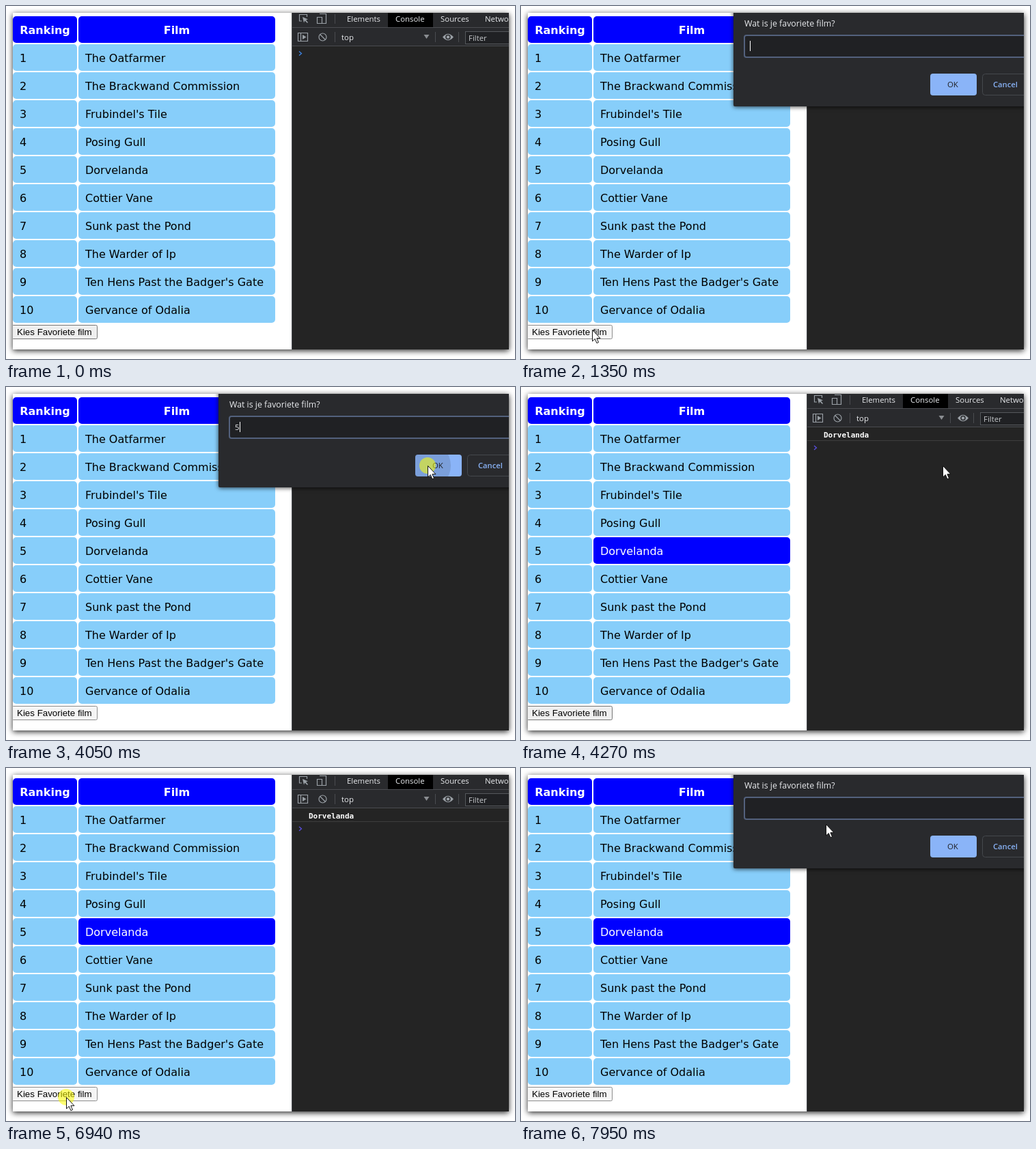
These frames come from a looping animation (745x517 px, 8 s). An HTML page:

```html
<!DOCTYPE html>
<html lang="nl">
<head>
<meta charset="utf-8">
<title>Favoriete film</title>
<style>
  html, body { margin: 0; width: 100%; height: 100%; overflow: hidden; background: #fff; }
  svg { display: block; width: 745px; height: 517px; }
  .page { font: 16px "DejaVu Sans", sans-serif; }
  .head { font-weight: 700; fill: #fff; text-anchor: middle; }
  .btn { font: 13.333px "Liberation Sans", Arial, sans-serif; }
  .tools { font: 11.4px "Open Sans", sans-serif; fill: #e8eaed; }
  .mono { font: 700 11px "DejaVu Sans Mono", monospace; fill: #fff; }
  .ask { font-size: 12.35px; }
  .icon { fill: none; stroke: #9aa0a6; stroke-width: 1.2; }
  .rule { stroke: #4a4c50; }
  #frame { filter: drop-shadow(0 2px 4px rgba(0, 0, 0, .85)); }
  #box { filter: drop-shadow(0 1px 3px rgba(0, 0, 0, .7)); }
</style>
</head>
<body>
<svg id="stage" viewBox="0 0 745 517" xmlns="http://www.w3.org/2000/svg"></svg>
<script>
const LOOP = 8000;
const PICK = 4;
const films = [
  "The Oatfarmer", "The Brackwand Commission", "Frubindel's Tile", "Posing Gull", "Dorvelanda",
  "Cottier Vane", "Sunk past the Pond", "The Warder of Ip", "Ten Hens Past the Badger's Gate",
  "Gervance of Odalia"
];

const rect = (x, y, w, h, fill, more = "") =>
  `<rect x="${x}" y="${y}" width="${w}" height="${h}" fill="${fill}" ${more}/>`;
const text = (x, y, str, more = "") => `<text x="${x}" y="${y}" ${more}>${str}</text>`;
const path = (d, more = 'class="icon"') => `<path d="${d}" ${more}/>`;

function table() {
  const cells = (y, fill, id = "") =>
    rect(10, y, 94, 39, fill, 'rx="5"') + rect(106, y, 288, 39, fill, `rx="5" ${id}`);
  const head = cells(15, "#00f") + text(57, 41, "Ranking", 'class="head"') +
    text(250, 41, "Film", 'class="head"');
  const rows = films.map((name, i) => {
    const y = 56 + 41 * i;
    const picked = i === PICK;
    return cells(y, "#87cefa", picked ? 'id="pickCell"' : "") +
      text(20, y + 26, i + 1) + text(116, y + 26, name, picked ? 'id="pickText"' : "");
  });
  return `<g class="page">${head}${rows.join("")}</g>`;
}

function devtools() {
  const tabs = [[499, "Elements"], [570, "Console"], [636, "Sources"], [701, "Network"]];
  return `<g class="tools">
    ${rect(418, 10, 318, 493, "#242424")}
    ${rect(418, 10, 318, 48, "#292a2d")}
    ${rect(559, 10, 66, 21, "#000")}
    ${path("M418.5 10V503M419 31.5H736M419 58.5H736M481.5 12V26M481.5 38V53M628.5 38V53M662.5 38V53", 'class="rule"')}
    ${tabs.map(([x, s]) => text(x, 23, s)).join("")}
    ${path("M433 22H429.500V12.500H440.500V16")}
    ${path("M434 16L442 19.500L439 20.500L442 24L441 25L437.500 21.500L436 24.500Z", 'fill="#9aa0a6"')}
    ${path("M458 25.500H455.500V18M459 11.500H468.500V25.500H463M455.500 16.500H462.500V25.500H455.500Z")}
    ${path("M427.500 39.500H441.500V51.500H427.500ZM431.500 39.500V51.500")}
    ${path("M434 42L439.500 45.500L434 49Z", 'fill="#9aa0a6"')}
    <circle cx="463.5" cy="45.500" r="5.500" class="icon" stroke-width="1.5"/>
    ${path("M459.500 41.500L467.500 49.500")}
    ${text(491, 50, "top")}
    ${path("M611.500 42H619.500L615.500 48Z", 'fill="#8a8d91"')}
    ${path("M639 45.500Q647 36 655 45.500Q647 55 639 45.500Z", 'fill="#9aa0a6"')}
    <circle cx="647" cy="45.500" r="3" fill="#9aa0a6" stroke="#292a2d" stroke-width="1.5"/>
    ${rect(672.5, 37.5, 80, 18, "#202124", 'stroke="#55585c"')}
    ${text(677, 51, "Filter", 'fill="#c4c7ca"')}
    <g id="log">${text(443, 74, films[PICK], 'class="mono"')}
      ${path("M419 78.500H736", 'stroke="#3d3d3d"')}</g>
    ${path("M429 66.500L432.500 69.500L429 72.500", 'id="chevron" fill="none" stroke-width="1.3"')}
  </g>`;
}

function dialog() {
  return `<g id="dialog" class="tools">
    ${rect(311, -10, 460, 157, "#292a2d", 'id="box" rx="2"')}
    ${text(327, 30, "Wat is je favoriete film?", 'class="ask"')}
    ${rect(327, 43, 440, 32, "#202124", 'rx="3" stroke="#53617d" stroke-width="2"')}
    ${text(335, 63, "5", 'id="typed"')}
    ${rect(335, 51, 1, 15, "#fff", 'id="caret"')}
    ${rect(599, 99, 68, 32, "#8ab4f8", 'rx="4"')}
    <circle id="ripple" cx="617" cy="115" fill="#202124" fill-opacity=".14" clip-path="url(#okClip)"/>
    ${text(624, 119, "OK", 'fill="#202124" font-weight="500"')}
    ${rect(675.5, 99.5, 80, 31, "none", 'rx="4" stroke="#45484d"')}
    ${text(691, 119, "Cancel", 'fill="#8ab4f8" font-weight="600" font-size="11.2"')}
  </g>`;
}

const stage = document.getElementById("stage");
stage.innerHTML = `
  <defs>
    <clipPath id="view">${rect(10, 10, 726, 493, "#000")}</clipPath>
    <clipPath id="okClip">${rect(599, 99, 68, 32, "#000", 'rx="4"')}</clipPath>
  </defs>
  ${rect(10, 10, 726, 493, "#fff", 'id="frame"')}
  <g clip-path="url(#view)">
    ${table()}
    ${rect(8.5, 467.5, 125, 20, "#efefef", 'id="button" rx="2"')}
    ${text(16, 482, "Kies Favoriete film", 'class="btn"')}
    ${devtools()}
    ${dialog()}
    <circle id="halo" r="12" fill="#ff0" fill-opacity=".55"/>
    ${path("M0 0V16.500L3.800 13L6.400 19.200L9 18.100L6.400 12.200H11.500Z",
      'id="cursor" fill="#fff" stroke="#111" stroke-width="1" stroke-linejoin="round"')}
  </g>`;

const el = {};
stage.querySelectorAll("[id]").forEach(node => el[node.id] = node);
const set = (node, attrs) => {
  for (const key in attrs) node.setAttribute(key, attrs[key]);
};
const show = (node, on) => set(node, { visibility: on ? "visible" : "hidden" });
const clamp = v => Math.max(0, Math.min(1, v));
const smooth = v => v * v * (3 - 2 * v);

// Pointer moves: start, end, number of steps, Bezier points
const moves = [
  [500, 880, 6, [[158, 498], [145, 480], [115, 480], [104, 474]]],
  [1900, 2310, 6, [[105, 476], [112, 490], [125, 500], [138, 506]]],
  [2620, 3390, 11, [[145, 494], [420, 420], [780, 100], [614, 112]]],
  [3470, 3650, 3, [[615, 113], [617, 115]]],
  [4430, 5230, 11, [[614, 118], [590, 172], [560, 168], [544, 138]]],
  [5300, 6070, 11, [[533, 128], [470, 220], [250, 430], [120, 467]]],
  [6150, 6770, 9, [[125, 466], [290, 425], [250, 510], [88, 482]]],
  [7100, 7870, 11, [[88, 482], [110, 470], [400, 250], [441, 103]]],
  [7950, 8000, 2, [[446, 82]]]
];

function bezier(pts, p) {
  while (pts.length > 1) {
    pts = pts.slice(1).map((b, i) => b.map((v, k) => pts[i][k] + (v - pts[i][k]) * p));
  }
  return pts[0];
}

function pointer(t) {
  const move = moves.filter(m => m[0] <= t).pop();
  if (!move) return null;
  const [start, end, steps, pts] = move;
  const gap = (end - start) / (steps - 1);
  return bezier(pts, smooth(clamp(Math.floor((t - start) / gap + 1e-6) / (steps - 1))));
}

// Dialog opacity changes in hard steps of 80 ms
function dialogLevel(t) {
  const opening = dt => dt < 0 ? 0 : [.09, .7][Math.floor(dt / 80)] ?? 1;
  if (t >= 7100) return opening(t - 7100);
  if (t >= 4110) return [.7, .1][Math.floor((t - 4110) / 80)] ?? 0;
  return opening(t - 1190);
}

function caretOn(t) {
  const start = t >= 7100 ? 7250 : t >= 2620 ? 2620 : 1250;
  return t >= start && Math.floor((t - start) / 500) % 2 === 0;
}

function draw(t) {
  const pos = pointer(t);
  show(el.cursor, pos);
  if (pos) {
    const [x, y] = pos.map(Math.round);
    set(el.cursor, { transform: `translate(${x + .5} ${y + .5})` });
    set(el.halo, { cx: x, cy: y });
  }
  const clicks = [[1030, 1190], [3880, 4190], [6940, 7180]];
  show(el.halo, clicks.some(([a, b]) => t >= a && t < b));

  const pressed = (t >= 1030 && t < 4190) || t >= 6940;
  const hover = pos && pos[0] < 134 && pos[1] >= 467 && pos[1] < 488;
  const [fill, stroke] = pressed ? ["#f5f5f5", "#8d8d8d"] :
    hover ? ["#e5e5e5", "#4f4f4f"] : ["#efefef", "#767676"];
  set(el.button, { fill, stroke });

  const done = t >= 4190;
  set(el.pickCell, { fill: done ? "#00f" : "#87cefa" });
  set(el.pickText, { fill: done ? "#fff" : "#000" });
  show(el.log, done);
  set(el.chevron, {
    stroke: done ? "#5a4fe0" : "#3d86e8",
    transform: `translate(0 ${done ? 19.5 : 0})`
  });

  const level = dialogLevel(t);
  const away = (1 - level) / .91;
  const scale = 1 + .017 * away;
  set(el.dialog, {
    opacity: level,
    display: level ? "inline" : "none",
    transform: `translate(${541 * (1 - scale)} ${-16.5 * away}) scale(${scale})`
  });
  const typed = t >= 2620 && t < 4300;
  set(el.typed, { display: typed ? "inline" : "none" });
  set(el.caret, { x: typed ? 342 : 335, display: caretOn(t) ? "inline" : "none" });
  const held = t - 3880;
  set(el.ripple, { r: held >= 0 && held < 400 ? 6 + held / 6.1 : 0 });
}

const began = performance.now();
function tick() {
  draw((performance.now() - began) % LOOP);
  requestAnimationFrame(tick);
}
tick();
</script>
</body>
</html>
```
